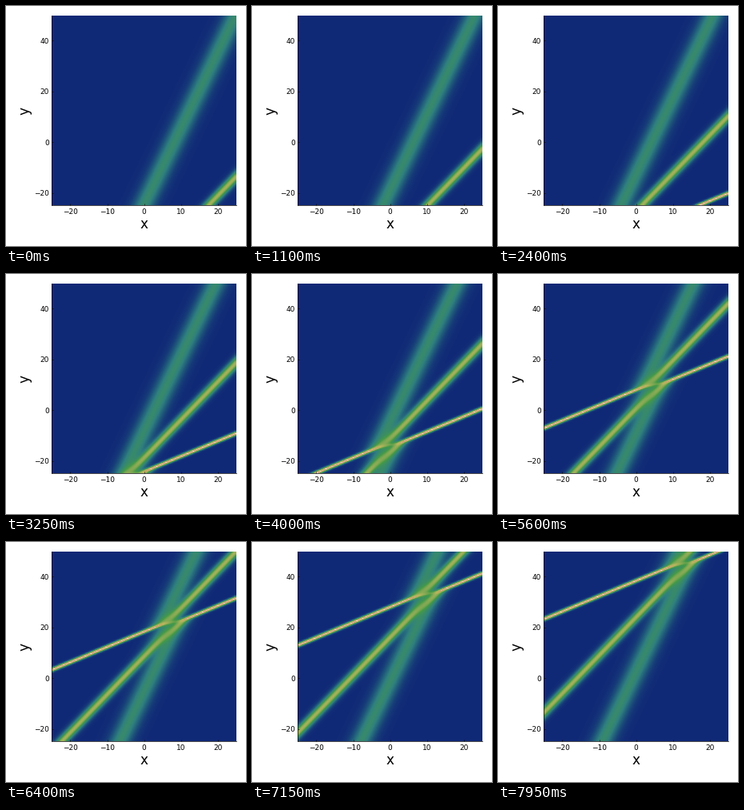
A matplotlib script for the animation above (8000 ms loop, 300 by 300 pixels).

```python
from itertools import combinations, product

import matplotlib.pyplot as plt
import numpy as np
from matplotlib.animation import FuncAnimation
from matplotlib.colors import PowerNorm

# Three line solitons of the KP equation, each given by a pair of wave numbers.
PAIRS = [(-1 / 3, 2 / 3), (-2 / 3, 4 / 3), (-0.67, 2.33)]
SIZE, DPI = 300, 100
FRAMES, STEP_MS = 160, 50
T_START, DT = -25.0, 0.25
X_LIM, Y_LIM = (-25, 25), (-25, 50)
LEFT, RIGHT, TOP, BOTTOM = 57.4, 288, 11.6, 249.4

X, Y = np.meshgrid(np.linspace(*X_LIM, 101), np.linspace(*Y_LIM, 151))


def coupling(p, q):
    top = (p[0] - q[0]) * (p[1] - q[1])
    return np.log(top / ((p[0] - q[1]) * (p[1] - q[0])))


def tau_terms():
    """Coefficients of x, y, t and the constant for every exponential in tau."""
    terms = []
    for picks in product((0, 1), repeat=len(PAIRS)):
        chosen = [p for p, on in zip(PAIRS, picks) if on]
        kx = sum(b - a for a, b in chosen)
        ky = -sum(b**2 - a**2 for a, b in chosen)
        kt = sum(b**3 - a**3 for a, b in chosen)
        const = sum(coupling(p, q) for p, q in combinations(chosen, 2))
        terms.append((kx, ky, kt, const))
    return np.array(terms)


KX, KY, KT, CONST = tau_terms()[:, :, None, None].transpose(1, 0, 2, 3)
PLANE = KX * X + KY * Y + CONST


def wave(t):
    """u = 2 (log tau)_xx, written as a weighted variance of the x rates."""
    phase = PLANE + KT * t
    w = np.exp(phase - phase.max(axis=0))
    w /= w.sum(axis=0)
    mean = (w * KX).sum(axis=0)
    return 2 * (w * (KX - mean) ** 2).sum(axis=0)


def px(x, y):
    return x / SIZE, 1 - y / SIZE


fig = plt.figure(figsize=(SIZE / DPI, SIZE / DPI), dpi=DPI, facecolor="white")
plt.rcParams["font.family"] = "DejaVu Sans"

ax = fig.add_axes([*px(LEFT, BOTTOM), (RIGHT - LEFT) / SIZE, (BOTTOM - TOP) / SIZE])
image = ax.imshow(
    wave(T_START),
    origin="lower",
    extent=[*X_LIM, *Y_LIM],
    aspect="auto",
    interpolation="bilinear",
    cmap="gist_earth",
    norm=PowerNorm(0.5, vmin=-0.045, vmax=4.5),
)
ax.set_xlim(X_LIM)
ax.set_ylim(Y_LIM)
ax.set_xticks([-20, -10, 0, 10, 20])
ax.set_yticks([-20, 0, 20, 40])
ax.tick_params(direction="in", length=1.5, width=0.4, labelsize=6.5, pad=2.6)
for side in ("top", "right"):
    ax.spines[side].set_visible(False)
for side in ("left", "bottom"):
    ax.spines[side].set_linewidth(0.5)

label = dict(fontsize=12.2, ha="center", va="baseline", rotation_mode="anchor")
fig.text(*px(172.7, 278), "x", **label)
fig.text(*px(28, 130.5), "y", rotation=90, **label)


def draw(i):
    image.set_data(wave(T_START + DT * i))
    return [image]


anim = FuncAnimation(fig, draw, frames=FRAMES, interval=STEP_MS, repeat=True, repeat_delay=0)
plt.show()
```
